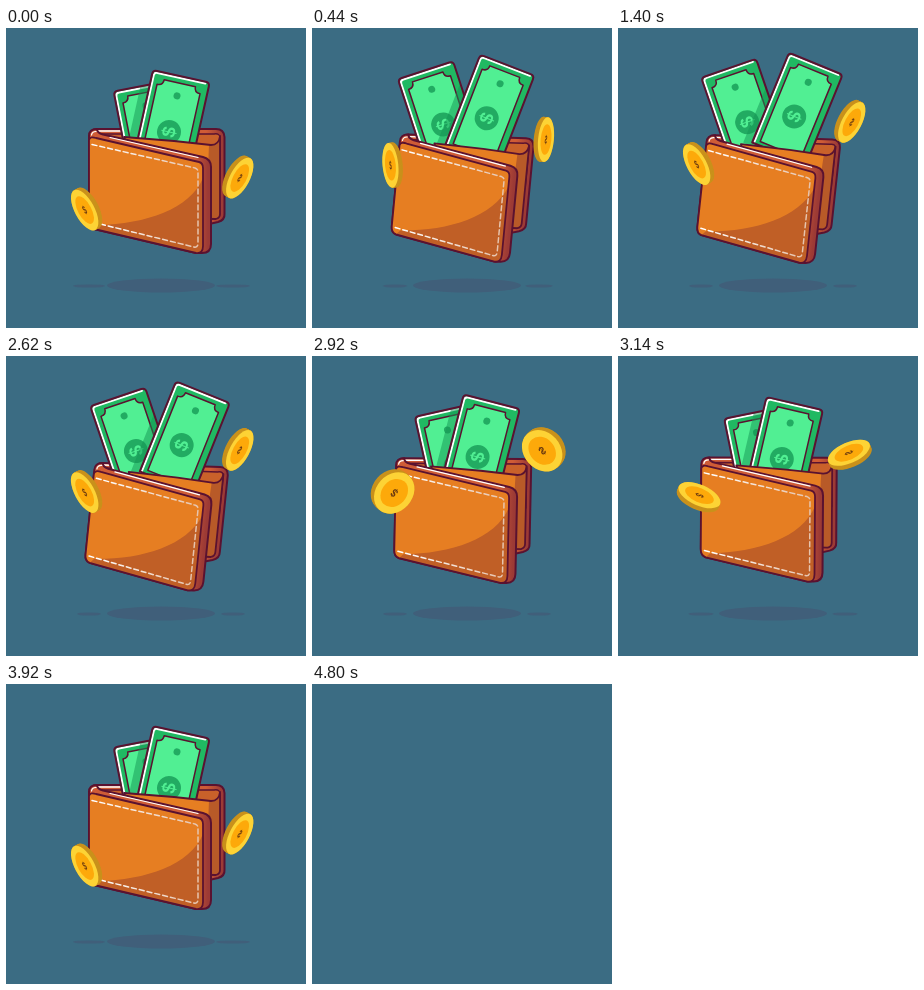
Recreate the animation shown at these times as an HTML page with a canvas. Size 300 by 300 pixels, loop 4820 ms.

```html
<!DOCTYPE html>
<html lang="en">
<head>
<meta charset="utf-8">
<title>Wallet</title>
<style>
html, body { margin: 0; width: 100%; height: 100%; overflow: hidden; background: #3b6c83; }
canvas { display: block; width: 300px; height: 300px; }
</style>
</head>
<body>
<canvas id="stage"></canvas>
<script>
const LOOP = 4820, STEP = 20;
const OPEN_TIME = 1400, CLOSE_START = 2612, CLOSE_TIME = 1308, BLANK_AT = 4800;
const INK = '#5a1230';
const FONT = '"Liberation Sans", Arial, sans-serif';

const canvas = document.getElementById('stage');
const ctx = canvas.getContext('2d');
const ratio = window.devicePixelRatio || 1;
canvas.width = canvas.height = 300 * ratio;

const clamp = x => Math.min(1, Math.max(0, x));
const lerp = (a, b, p) => a + (b - a) * p;
const rad = d => d * Math.PI / 180;
const expoOut = x => x >= 1 ? 1 : 1 - 2 ** (-10 * x);
const sineInOut = x => (1 - Math.cos(Math.PI * clamp(x))) / 2;
const spinOut = x => 1 - (1 - clamp(x) ** 1.6) ** 3.5;
const span = (t, from, to) => sineInOut((t - from) / (to - from));

const shapes = {
  back: 'M84 108Q84 101 91 101H210Q218 101 218.500 109V186Q219 192 212 194L190 199L100 150Z',
  inside: 'M95 106H208Q214 105 214 110V150L160 160Z',
  pocket: 'M118 109L168 113L205 117Q213 117 214 108V186Q214 190 210 191L150 190Z',
  pocketShade: 'M203 117Q213 118 214 108V186Q214 190 210 191H200Z',
  body: 'M83 108Q83 101 91 101Q91 105 97 106.500L197 129Q205 131 205 139V216Q205 225 196 225L190 225L88 201Q83 199 83 193Z',
  face: 'M83 112Q84 108 90 110L193 134Q197 135 197 140V218Q197 226 190 225L88 201Q83 199 83 193Z',
  shade: 'M197 150C184 181 140 196 92 197L88 201L190 225Q197 226 197 218Z',
  stitch: 'M86 116.500L189 140Q192 141 192 144V215Q192 220 188 219L86 194',
  rimLight: 'M85.500 107Q86 103.500 90 103.500M104 109.500L192 129.500',
  backLight: 'M92 103H122',
  note: 'M-25 -57H25Q29 -57 29 -53V40H-29V-53Q-29 -57 -25 -57Z',
  noteLight: 'M-27.200 40V-52Q-27.200 -55.200 -24 -55.200H25',
  panel: 'M-16 -50H16Q16 -44 22 -44V36H-22V-44Q-16 -44 -16 -50Z'
};
for (const k in shapes) shapes[k] = new Path2D(shapes[k]);

function paint(path, fill, line, width = 2) {
  if (fill) { ctx.fillStyle = fill; ctx.fill(path); }
  if (line) { ctx.strokeStyle = line; ctx.lineWidth = width; ctx.stroke(path); }
}

function oval(x, y, rx, ry, fill) {
  ctx.fillStyle = fill;
  ctx.beginPath();
  ctx.ellipse(x, y, rx, ry, 0, 0, 7);
  ctx.fill();
}

function fade(x0, x1, from, to) {
  const g = ctx.createLinearGradient(x0, 0, x1, 0);
  g.addColorStop(0, from);
  g.addColorStop(1, to);
  return g;
}

function dollar(size, fill) {
  ctx.font = `bold ${size}px ${FONT}`;
  ctx.textAlign = 'center';
  ctx.textBaseline = 'middle';
  ctx.fillStyle = fill;
  ctx.fillText('$', 0, size * 0.06);
}

function group(draw) {
  ctx.save();
  draw();
  ctx.restore();
}

function place(pose) {
  ctx.translate(pose.x, pose.y);
  ctx.rotate(rad(pose.angle));
}

function note(pose, shadowPose) {
  group(() => {
    place(pose);
    paint(shapes.note, '#20b962');
    paint(shapes.noteLight, null, '#fff', 2);
    paint(shapes.panel, '#51ef93', INK, 1.5);
    oval(0, -37, 3.5, 3.5, '#22ab62');
    oval(0, 0, 12, 12, '#22ab62');
    group(() => { ctx.rotate(-Math.PI / 2); dollar(19, '#51ef93'); });
    if (shadowPose) group(() => {
      ctx.clip(shapes.note);
      ctx.rotate(rad(-pose.angle));
      ctx.translate(-pose.x - 9, -pose.y);
      place(shadowPose);
      paint(shapes.note, 'rgba(20,150,85,.5)');
    });
    paint(shapes.note, null, INK);
  });
}

function tilt(p) {
  ctx.transform(1 - 0.015 * p, 0.035 * p, -0.108 * p, 1, 18.46 * p, 3.06 * p);
}

function walletBack(p) {
  tilt(p);
  paint(shapes.back, fade(200, 216, '#cf5c36', '#9c3a35'), INK);
  paint(shapes.inside, '#c9612a', INK, 1.5);
  paint(shapes.backLight, null, '#fff', 1.3);
}

function walletFront(p) {
  tilt(p);
  paint(shapes.pocket, '#e67e22');
  paint(shapes.pocketShade, '#b85a28');
  paint(shapes.pocket, null, INK, 1.8);
  paint(shapes.body, fade(186, 202, '#cf5c36', '#9c3a35'), INK);
  paint(shapes.rimLight, null, '#fff', 1.2);
  paint(shapes.face, '#e67e22');
  paint(shapes.shade, '#c05f26');
  paint(shapes.face, null, INK, 1.8);
  ctx.setLineDash([5, 3]);
  paint(shapes.stitch, null, fade(90, 192, '#fff', '#e6c4ae'), 1.5);
  ctx.setLineDash([]);
}

// The disc's axis swings round by phi; the rim shows on the side it leans to.
function coin(x, y, phi, flip) {
  group(() => {
    ctx.translate(x, y);
    ctx.scale(flip, 1);
    ctx.rotate(rad(phi));
    const r = 22.5, squash = 0.54 - 0.27 * Math.cos(rad(phi - 40)), w = r * squash;
    for (let d = 2.2; d > -2.2; d -= 0.6) oval(d, 0, w, r, '#c9911b');
    ctx.translate(-2.2, 0);
    oval(0, 0, w, r, '#fdd335');
    oval(0, 0, w * 0.68, r * 0.68, '#fda90a');
    ctx.scale(squash, 1);
    dollar(12, '#6b3a10');
  });
}

function stateAt(t) {
  if (t < CLOSE_START) {
    const x = clamp(t / OPEN_TIME);
    return {
      open: expoOut(x),
      spin: 1 - spinOut(1 - x),
      left: span(t, 0, 500),
      right: span(t, 90, 660)
    };
  }
  const s = t - CLOSE_START, x = clamp(s / CLOSE_TIME);
  return {
    open: 1 - expoOut(x),
    spin: 1 - spinOut(x),
    left: 1 - span(s, 390, 990),
    right: 1 - span(s, 330, CLOSE_TIME)
  };
}

function draw(t) {
  ctx.setTransform(ratio, 0, 0, ratio, 0, 0);
  ctx.fillStyle = '#3b6c83';
  ctx.fillRect(0, 0, 300, 300);
  if (t >= BLANK_AT) return;
  ctx.lineJoin = ctx.lineCap = 'round';

  const { open, spin, left, right } = stateAt(t);
  const dark = '#405f7a';
  oval(155, 257.5, 54, 7, dark);
  oval(83, 258, lerp(16, 12, left), 1.6, dark);
  oval(227, 258, lerp(17, 12, right), 1.6, dark);

  const noteL = { x: lerp(147, 129.2, open), y: lerp(114, 94.2, open), angle: lerp(-11, -19, open) };
  const noteR = { x: lerp(163, 176.2, open), y: lerp(104, 88.5, open), angle: lerp(12.5, 22.3, open) };
  group(() => walletBack(open));
  note(noteL, noteR);
  note(noteR);
  group(() => walletFront(open));

  const phi = -28 + 360 * spin;
  coin(80.6, lerp(181, 135.5, left), phi, 1);
  coin(231.8, lerp(149, 93.3, right), phi, -1);
}

const start = performance.now();
function tick() {
  const t = (performance.now() - start) % LOOP;
  draw(Math.floor(t / STEP) * STEP);
  requestAnimationFrame(tick);
}
tick();
</script>
</body>
</html>
```
